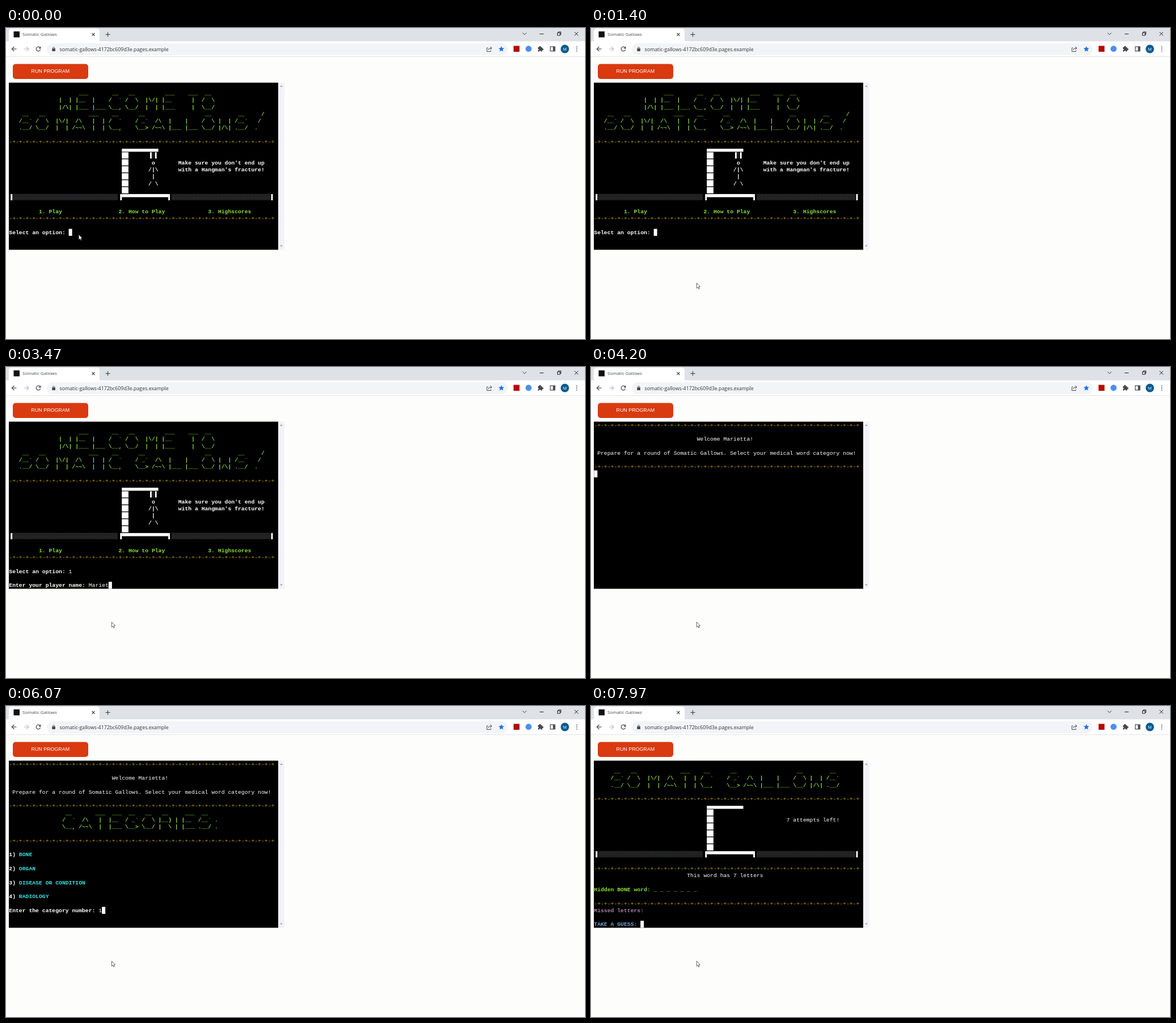
Write an HTML page with a canvas that moves like this. It is 1021 by 549 pixels and loops after 8000 ms.

```html
<!DOCTYPE html>
<html lang="en">
<head>
<meta charset="utf-8">
<title>Somatic Gallows</title>
<style>
html, body { margin: 0; width: 100%; height: 100%; overflow: hidden; background: #fdfdfc; }
canvas { display: block; width: 1021px; height: 549px; }
</style>
</head>
<body>
<canvas id="stage"></canvas>
<script>
const W = 1021, H = 549, LOOP = 8000;
const canvas = document.getElementById('stage');
const ctx = canvas.getContext('2d');
const dpr = window.devicePixelRatio || 1;
canvas.width = W * dpr;
canvas.height = H * dpr;

const UI = '"Open Sans", "Noto Sans", sans-serif';
const MONO = '"Liberation Mono", monospace';
const WHITE = '#ffffff', GREEN = '#8ae234', YELLOW = '#c4a000';
const CYAN = '#34e2e2', MAUVE = '#ad7fa8', BLUE = '#729fcf';
const INK = '#45494d';
const TITLE = 'Somatic Gallows', PLAYER = 'Marietta';
const ADDRESS = 'anatomy-gallows-4172bc609d3e.pages.example'.replace('anatomy', 'somatic');

// Terminal grid: 80 columns by 24 rows.
const TERM = { x: 5.3, y: 96.5, cw: 5.851, rh: 12.29 };
const colX = c => TERM.x + c * TERM.cw;
const rowY = r => TERM.y + r * TERM.rh;

// Event times in ms.
const AT = { moveFrom: 880, moveTo: 1380, pick: 2050, askName: 2520, type: 2750, key: 130,
  welcome: 4200, categories: 5400, choose: 5920, game: 6720 };

// Three-line stick letters, lines parted by @.
const LETTERS = {
  A: '@ /\\@/~~\\', C: ' __@/  `@\\__,', E: ' ___@|__@|___', G: ' __@/ _`@\\__>',
  I: '@|@|', L: '@|@|___', M: '@ |\\/|@ |  |', O: ' __@/  \\@\\__/',
  R: ' __@|__)@|  \\', S: ' __@/__`@.__/', T: '___@ |@ |', W: '@|  |@|/\\|',
  '!': '   /@  /@ .', ':': '@.@.', ' ': '@@'
};
const ADVANCE = { I: 2, T: 4, M: 6, ' ': 3 };

function rect(x, y, w, h, color) {
  ctx.fillStyle = color;
  ctx.fillRect(x, y, w, h);
}

function round(x, y, w, h, r, color) {
  ctx.fillStyle = color;
  ctx.beginPath();
  ctx.roundRect(x, y, w, h, r);
  ctx.fill();
}

function disc(x, y, r, color) {
  ctx.fillStyle = color;
  ctx.beginPath();
  ctx.arc(x, y, r, 0, Math.PI * 2);
  ctx.fill();
}

function path(points, color, width = 1) {
  ctx.strokeStyle = color;
  ctx.lineWidth = width;
  ctx.beginPath();
  points.forEach(([x, y], i) => i ? ctx.lineTo(x, y) : ctx.moveTo(x, y));
  ctx.stroke();
}

function polygon(points, color) {
  ctx.fillStyle = color;
  ctx.beginPath();
  points.forEach(([x, y]) => ctx.lineTo(x, y));
  ctx.closePath();
  ctx.fill();
}

function label(str, x, y, font, color, align = 'left') {
  ctx.font = font;
  ctx.fillStyle = color;
  ctx.textAlign = align;
  ctx.textBaseline = 'alphabetic';
  ctx.fillText(str, x, y);
}

function drawTabs() {
  rect(0, 0, W, 24, '#dee1e6');
  round(5, 1, 160, 26, 5, WHITE);
  rect(0, 23.5, W, 27, WHITE);
  rect(13.5, 6, 10.5, 10.5, '#111111');
  label(TITLE, 29, 14, '8px ' + UI, INK);
  path([[151.5, 9], [156.5, 14]], INK, 1.1);
  path([[156.5, 9], [151.5, 14]], INK, 1.1);
  path([[175.5, 11.5], [183.5, 11.5]], INK, 1.2);
  path([[179.5, 7.5], [179.5, 15.5]], INK, 1.2);
  path([[911, 8.5], [914.3, 11.8], [917.6, 8.5]], '#333');
  path([[941, 10.5], [948, 10.5]], '#222');
  ctx.strokeStyle = '#222';
  ctx.strokeRect(972.5, 8.5, 4.5, 4.5);
  path([[974, 8], [974, 6.8], [978.5, 6.8], [978.5, 11.5], [977, 11.5]], '#222');
  path([[1002.5, 7], [1009, 13.5]], '#222');
  path([[1009, 7], [1002.5, 13.5]], '#222');
}

function arrow(x, dir, color) {
  path([[x - 4.2 * dir, 37], [x + 4 * dir, 37]], color, 1.2);
  path([[x, 33], [x - 4.2 * dir, 37], [x, 41]], color, 1.2);
}

function drawStar(x, y, r) {
  const points = [];
  for (let i = 0; i < 10; i++) {
    const a = -Math.PI / 2 + i * Math.PI / 5, d = i % 2 ? r * 0.45 : r;
    points.push([x + d * Math.cos(a), y + d * Math.sin(a)]);
  }
  polygon(points, '#1a73e8');
}

function drawToolbar() {
  rect(0, 50, W, 1, '#e3e4e6');
  round(72, 27, 813, 21, 10.5, '#f2f4f8');
  arrow(14.5, 1, INK);
  arrow(36, -1, '#bdc1c6');

  ctx.strokeStyle = INK;
  ctx.lineWidth = 1.2;
  ctx.beginPath();
  ctx.arc(57, 37, 3.8, 0.35, Math.PI * 1.8);
  ctx.stroke();
  polygon([[61.5, 32.5], [61.5, 36.5], [57.5, 36.5]], INK);

  rect(81.3, 36, 5.6, 5, INK);
  ctx.lineWidth = 1;
  ctx.beginPath();
  ctx.arc(84.1, 35.6, 1.7, Math.PI, 0);
  ctx.stroke();
  label(ADDRESS, 94.5, 40.5, '8.8px ' + UI, '#303437');

  path([[850, 35], [848, 35], [848, 41.5], [855, 41.5], [855, 39.5]], INK);
  path([[850.5, 39], [851.5, 36.3], [856, 35.5]], INK);
  path([[854, 33], [856.8, 35.5], [854, 38]], INK);
  drawStar(873.5, 37.3, 5.3);

  rect(895, 31.5, 10.5, 10.5, '#b30b00');
  disc(921.5, 36.7, 5.4, '#4a8ff0');
  rect(938, 34, 7.5, 7.5, INK);
  disc(941.5, 33.5, 1.7, INK);
  disc(946, 37.5, 1.7, INK);
  disc(938.2, 38, 1.2, WHITE);
  disc(941.7, 41.3, 1.2, WHITE);
  ctx.strokeStyle = INK;
  ctx.lineWidth = 1.2;
  ctx.strokeRect(959.8, 33, 8.2, 7.8);
  rect(964.5, 33, 3.5, 7.8, INK);
  disc(985.5, 37, 7.4, '#075a8f');
  label(PLAYER[0], 985.5, 39.8, '7.5px ' + UI, WHITE, 'center');
  for (let i = -1; i < 2; i++) disc(1006.5, 37 + i * 3.6, 0.95, INK);
}

function drawPage() {
  rect(0, 0, W, H, '#fdfdfc');
  drawTabs();
  drawToolbar();
  round(12, 63.5, 133, 26.5, 5, '#d93a10');
  label('RUN PROGRAM', 78.3, 79.3, '8.9px "Liberation Sans", sans-serif', WHITE, 'center');
  rect(5, 96.5, 475, 295, '#000000');
  rect(480, 96.5, 11, 295, '#f3f2f9');
  polygon([[483, 104], [488, 104], [485.5, 101.2]], '#a3a3a3');
  polygon([[483, 383.5], [488, 383.5], [485.5, 386.3]], '#a3a3a3');
}

function put(col, row, str, color = WHITE, bold = false) {
  label(str, colX(col), rowY(row) + 9.2, (bold ? 'bold ' : '') + '9.75px ' + MONO, color);
}

function art(str, col, row) {
  for (const ch of str) {
    LETTERS[ch].split('@').forEach((line, i) => put(col, row + i, line, GREEN, true));
    col += ADVANCE[ch] || 5;
  }
}

function rule(...rows) {
  for (const r of rows) put(0, r, '-+'.repeat(40), YELLOW);
}

function caret(col, row) {
  rect(colX(col), rowY(row), 6, TERM.rh, WHITE);
}

// Blocks stand a little lower than the row, leaving a thin gap.
function block(col, row, cols, top = 0, bottom = 11) {
  rect(colX(col), rowY(row) + top, cols * TERM.cw, bottom - top, WHITE);
}

function shade(col, row, cols) {
  const x0 = colX(col), y0 = rowY(row), n = Math.floor(cols * TERM.cw / 2);
  for (let j = 0; j < 7; j++) {
    for (let i = 0; i < n; i++) {
      rect(x0 + i * 2 + j % 2, y0 + j * 1.6, 0.9, 0.9, i % 3 ? '#7f8c9c' : '#94805c');
    }
  }
}

function gallows(row) {
  block(34, row, 11, 6, 11.3);
  for (let i = 1; i < 7; i++) block(34, row + i, 2);
  const base = row + 7;
  block(0.5, base, 0.5);
  shade(1, base, 32);
  block(33.5, base, 0.5);
  block(34, base, 14, 0, 5.5);
  block(48, base, 0.5);
  shade(49, base, 30);
  block(79, base, 0.5);
}

function menuScreen(t) {
  art('WELCOME TO', 15, 1);
  art(TITLE.toUpperCase() + '!', 3, 4);
  rule(8, 19);
  gallows(9);
  block(42.5, 10, 0.5);
  shade(43, 10, 1);
  block(44, 10, 0.5);
  put(43, 11, 'o', WHITE, true);
  put(42, 12, '/|\\', WHITE, true);
  put(43, 13, '|', WHITE, true);
  put(42, 14, '/ \\', WHITE, true);
  put(51, 11, "Make sure you don't end up", WHITE, true);
  put(51, 12, "with a Hangman's fracture!", WHITE, true);
  put(9, 18, '1. Play', GREEN, true);
  put(33, 18, '2. How to Play', GREEN, true);
  put(60, 18, '3. Highscores', GREEN, true);
  put(0, 21, 'Select an option:', WHITE, true);
  if (t >= AT.pick) put(18, 21, '1');
  if (t < AT.askName) {
    caret(t < AT.pick ? 18 : 19, 21);
    return;
  }
  const typed = Math.floor((t - AT.type) / AT.key) + 1;
  const count = Math.max(0, Math.min(PLAYER.length, typed));
  put(0, 23, 'Enter your player name:', WHITE, true);
  put(24, 23, PLAYER.slice(0, count));
  caret(24 + count, 23);
}

function categoryScreen(t) {
  rule(0, 6);
  put(31, 2, `Welcome ${PLAYER}!`);
  put(1, 4, `Prepare for a round of ${TITLE}. Select your medical word category now!`);
  if (t < AT.categories) {
    caret(0, 7);
    return;
  }
  art('CATEGORIES:', 16, 7);
  rule(11);
  ['BONE', 'ORGAN', 'DISEASE OR CONDITION', 'RADIOLOGY'].forEach((name, i) => {
    put(0, 13 + i * 2, `${i + 1})`, WHITE, true);
    put(3, 13 + i * 2, name, CYAN, true);
  });
  put(0, 21, 'Enter the category number:', WHITE, true);
  if (t >= AT.choose) put(27, 21, '1');
  caret(t < AT.choose ? 27 : 28, 21);
}

function gameScreen() {
  art(TITLE.toUpperCase(), 5, 1);
  rule(5, 15, 20);
  gallows(6);
  put(58, 8, '7 attempts left!');
  put(28, 16, 'This word has 7 letters');
  put(0, 18, 'Hidden BONE word: ' + '_ '.repeat(7), GREEN, true);
  put(0, 21, 'Missed letters:', MAUVE, true);
  put(0, 23, 'TAKE A GUESS:', BLUE, true);
  caret(14, 23);
}

function drawPointer(t) {
  const p = Math.max(0, Math.min(1, (t - AT.moveFrom) / (AT.moveTo - AT.moveFrom)));
  const e = p * p * (3 - 2 * p);
  ctx.save();
  ctx.translate(128.3 + 58 * e, 364.8 + 85.5 * e);
  const shape = [[0, 0], [0, 9], [2.1, 7.1], [3.5, 10.2], [4.9, 9.6], [3.6, 6.6], [6.2, 6.4]];
  polygon(shape, WHITE);
  path([...shape, shape[0]], '#30303a', 0.75);
  ctx.restore();
}

function frame(now) {
  const t = now % LOOP;
  ctx.setTransform(dpr, 0, 0, dpr, 0, 0);
  drawPage();
  if (t < AT.welcome) menuScreen(t);
  else if (t < AT.game) categoryScreen(t);
  else gameScreen();
  drawPointer(t);
}

const start = performance.now();
function tick() {
  frame(performance.now() - start);
  requestAnimationFrame(tick);
}
tick();
</script>
</body>
</html>
```
